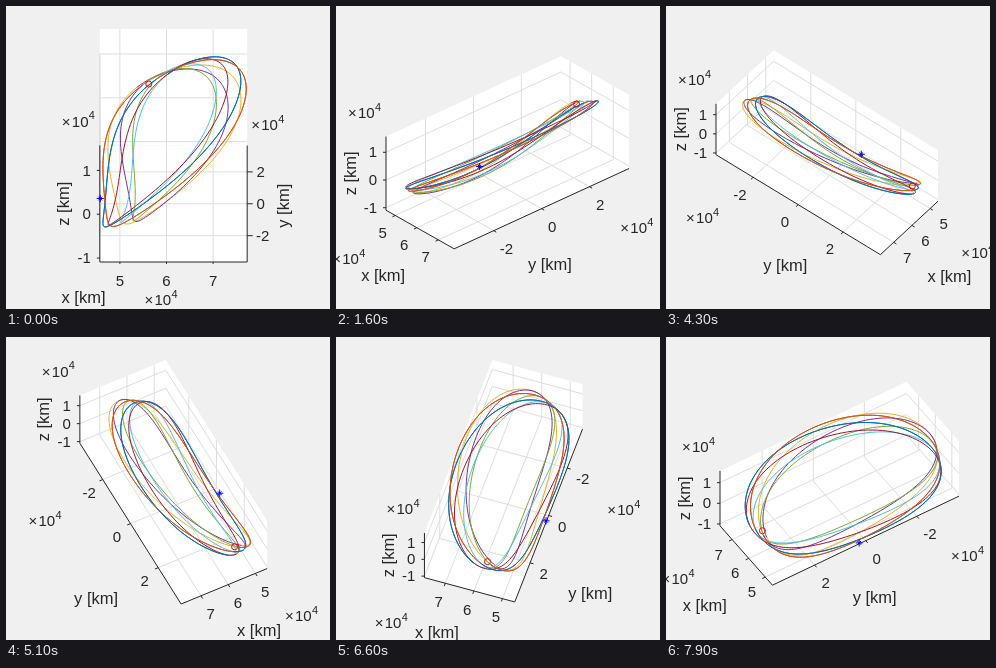
Recreate the animation shown at these times as an HTML page with a canvas. Size 324 by 303 pixels, loop 8000 ms.

```html
<!DOCTYPE html>
<html>
<head>
<meta charset="utf-8">
<style>
html, body { margin: 0; width: 100%; height: 100%; overflow: hidden; background: #f0f0f0; }
canvas { display: block; width: 324px; height: 303px; }
</style>
</head>
<body>
<canvas id="stage" width="324" height="303"></canvas>
<script>
const ctx = document.getElementById('stage').getContext('2d');
const FONT = '"Liberation Sans", Arial, sans-serif';
const COLORS = ['#0072bd', '#d95319', '#edb120', '#7e2f8e', '#77ac30', '#4dbeee', '#a2142f'];
const HALF = [1.58, 3.65, 1.33];
const CENTER = [6.15, 0, 0.24];
const TICKS = [[5, 6, 7], [-2, 0, 2], [-1, 0, 1]];
const NAMES = ['x [km]', 'y [km]', 'z [km]'];
const STAR = [-1.57, 0.25, -1.3];
const RING = [-0.53, 3.36, 0.18];
const REVS = 9, STEPS = 120;
const { sin, cos, abs, min, max, PI, sign, hypot } = Math;

// Quasi-periodic orbit: a main oscillation plus a slowly drifting one.
function orbit(u) {
  const a = PI / 2 - 2 * PI * u;
  const drift = 1.13 - 2 * PI * u / 7;
  const mod = cos(a - drift);
  return [
    -0.21 + 1.25 * cos(a) + 0.34 * mod + 0.24 * cos(2 * a) - 0.06 * cos(3 * a),
    3.5 * sin(a) + 0.14 * sin(drift),
    0.04 + 1.19 * cos(a) + 0.1 * mod - 0.04 * cos(2 * a) + 0.12 * sin(a)
  ];
}

const revs = Array.from({ length: REVS }, (_, r) =>
  Array.from({ length: STEPS + 1 }, (_, i) => orbit(r + i / STEPS)));

// Orthographic camera, scaled so the box fits the free area.
function camera(frame) {
  const az = frame * PI / 60;
  const el = (20 + 2 / 3 * (60 - abs(60 - frame))) * PI / 180;
  const ca = cos(az), sa = sin(az), ce = cos(el), se = sin(el);
  const w = 2 * (HALF[0] * abs(ca) + HALF[1] * abs(sa));
  const h = 2 * ((HALF[0] * abs(sa) + HALF[1] * abs(ca)) * se + HALF[2] * ce);
  const left = frame > 60 ? 54 : 50;
  const right = frame > 30 && frame < 60 ? 272 : 293;
  const bottom = 256 + min(11, 29 * abs(sa));
  const s = min((right - left) / w, (bottom - 23) / h);
  const cx = min(max(167.5, left + s * w / 2), right - s * w / 2);
  const cy = min(146.5, bottom - s * h / 2);
  return {
    front: [frame > 60 ? -1 : 1, frame > 30 && frame < 90 ? 1 : -1],
    project: ([x, y, z]) => [
      cx + s * (x * ca + y * sa),
      cy - s * (se * (y * ca - x * sa) + z * ce)
    ]
  };
}

function path(points, color, fill) {
  ctx.beginPath();
  points.forEach(p => ctx.lineTo(p[0], p[1]));
  if (fill) {
    ctx.fillStyle = color;
    ctx.fill();
  } else {
    ctx.strokeStyle = color;
    ctx.stroke();
  }
}

function text(str, x, y, size, align = 'center') {
  ctx.font = size + 'px ' + FONT;
  ctx.textAlign = align;
  ctx.fillStyle = '#262626';
  ctx.fillText(str, x, y + 1);
}

function title(str, x, y, upright) {
  ctx.save();
  ctx.translate(x, y);
  if (upright) ctx.rotate(-PI / 2);
  text(str, 0, 0, 16.5);
  ctx.restore();
}

function exponent(x, y) {
  text('×', x - 17, y + 1, 15, 'left');
  text('10', x - 7, y + 1, 15, 'left');
  text('4', x + 10, y - 5, 11, 'left');
}

function drawBox({ front, project }) {
  const back = [-front[0], -front[1], -1];
  const at = (i, a, j, b, k, c) => {
    const p = [];
    p[i] = a; p[j] = b * HALF[j]; p[k] = c * HALF[k];
    return project(p);
  };
  for (let i = 0; i < 3; i++) {
    const j = (i + 1) % 3, k = (i + 2) % 3, e = back[i] * HALF[i];
    path([at(i, e, j, -1, k, -1), at(i, e, j, 1, k, -1), at(i, e, j, 1, k, 1), at(i, e, j, -1, k, 1)], '#fff', true);
  }
  for (let i = 0; i < 3; i++) {
    const j = (i + 1) % 3, k = (i + 2) % 3;
    for (const v of TICKS[i]) {
      const a = v - CENTER[i];
      path([at(i, a, j, -back[j], k, back[k]), at(i, a, j, back[j], k, back[k]), at(i, a, j, back[j], k, -back[k])], '#dedede');
    }
  }
}

function drawFloorAxis(i, { front, project }) {
  const o = 1 - i;
  const point = (a, out = 0) => {
    const p = [0, 0, -HALF[2]];
    p[i] = a;
    p[o] = front[o] * (HALF[o] + out);
    return project(p);
  };
  const near = point(front[i] * HALF[i]), far = point(-front[i] * HALF[i]);
  const mid = point(0), base = project([0, 0, -HALF[2]]);
  const dx = far[0] - near[0], dy = far[1] - near[1], len = hypot(dx, dy);
  let nx = -dy / len, ny = dx / len;
  if (nx * (mid[0] - base[0]) + ny * (mid[1] - base[1]) < 0) { nx = -nx; ny = -ny; }
  const side = sign(nx) || -1, n = abs(nx);

  path([near, far], '#262626');
  for (const v of TICKS[i]) {
    const p = point(v - CENTER[i]), q = point(v - CENTER[i], 0.12);
    path([p, q], '#262626');
    const ox = side * 13.5 * min(1, 1.9 * n) + (v < 0 && nx > 0.2 ? 2 : 0);
    text(v, p[0] + ox, p[1] + min(30 * ny, 7 + 12 * ny), 15);
  }

  if (ny < 0.1) {
    title(NAMES[i], mid[0] + side * 36, mid[1] + 2, true);
    exponent(far[0] + side * 21, far[1] - 22);
  } else if (i === 0 && n < 0.03) {
    title(NAMES[i], mid[0] - 90, mid[1] + 35);
    exponent(mid[0] - 12, mid[1] + 37);
  } else {
    const ox = i ? 48 * nx * n : side * (28 + 18 * n);
    const oy = i ? 38 + 43 * n : 38 + 16 * n;
    title(NAMES[i], mid[0] + ox, mid[1] + oy);
    exponent(far[0] + ox, far[1] + oy + 2);
  }
}

function drawHeightAxis({ front, project }) {
  const corners = [[front[0], -front[1]], [-front[0], front[1]]]
    .map(([a, b]) => [a * HALF[0], b * HALF[1]])
    .sort((a, b) => project([...a, 0])[0] - project([...b, 0])[0]);
  const point = z => project([...corners[0], z]);
  const top = point(HALF[2]), mid = point(0);
  path([top, point(-HALF[2])], '#262626');
  for (const v of TICKS[2]) {
    const [x, y] = point(v - CENTER[2]);
    path([[x, y], [x - 3, y]], '#262626');
    text(v, x - 9, y, 15, 'right');
  }
  title(NAMES[2], mid[0] - 36, mid[1], true);
  exponent(top[0] - 21, top[1] - 25);
}

function drawMarkers({ project }) {
  const [sx, sy] = project(STAR);
  for (let i = 0; i < 4; i++) {
    const r = i % 2 ? 2.6 : 3.6, dx = r * cos(i * PI / 4), dy = r * sin(i * PI / 4);
    path([[sx - dx, sy - dy], [sx + dx, sy + dy]], '#00f');
  }
  const [rx, ry] = project(RING);
  ctx.beginPath();
  ctx.arc(rx, ry, 3, 0, 2 * PI);
  ctx.strokeStyle = '#f00';
  ctx.stroke();
}

function draw(now) {
  const view = camera(Math.floor(now / 100) % 80);
  ctx.fillStyle = '#f0f0f0';
  ctx.fillRect(0, 0, 324, 303);
  ctx.lineWidth = 1;
  ctx.lineJoin = 'round';
  ctx.textBaseline = 'middle';
  drawBox(view);
  drawFloorAxis(0, view);
  drawFloorAxis(1, view);
  drawHeightAxis(view);
  revs.forEach((rev, r) => path(rev.map(view.project), COLORS[r % 7]));
  drawMarkers(view);
}

const start = performance.now();
function tick() {
  draw(performance.now() - start);
  requestAnimationFrame(tick);
}
tick();
</script>
</body>
</html>
```
